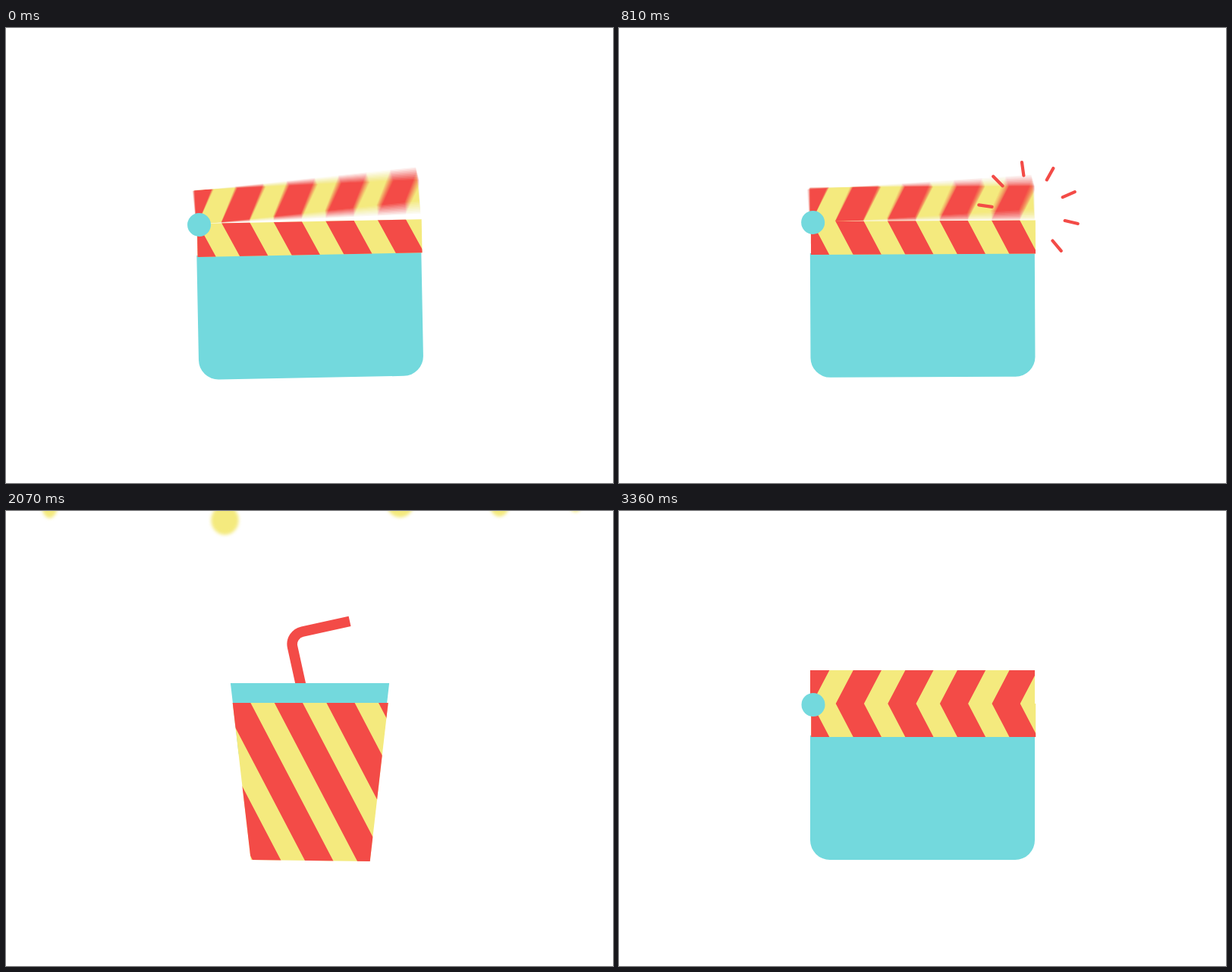
Recreate the animation shown at these times as an HTML page. Size 800 by 600 pixels, loop 3.63 s.

```html
<!DOCTYPE html>
<html lang="en">
<head>
<meta charset="utf-8">
<title>Movie snacks</title>
<style>
  html, body { margin: 0; width: 100%; height: 100%; overflow: hidden; background: #fff; }
  svg { display: block; width: 100%; height: 100%; }
</style>
</head>
<body>
<svg id="stage" viewBox="0 0 800 600">
  <defs>
    <clipPath id="armClip"><path id="armShape"/></clipPath>
    <clipPath id="bandClip"><path id="bandShape"/></clipPath>
  </defs>
  <g id="arm"></g>
  <path id="straw" d="M0 110V17A17 17 0 0 1 17 0H81" fill="none" stroke="#f34b47" stroke-width="13.6"/>
  <g id="corn" fill="#f4ea7e">
    <path id="heap" d="M309 240V210A92 65 0 0 1 493 210V240Z"/>
  </g>
  <g id="board">
    <path id="cyan" fill="#73d9dd"/>
    <g clip-path="url(#bandClip)">
      <rect x="200" y="200" width="400" height="300" fill="#f4ea7e"/>
      <path id="bandRed" fill="#f34b47"/>
    </g>
    <circle id="hinge" cx="256" cy="255.5" fill="#73d9dd"/>
  </g>
  <path id="sparks" fill="none" stroke="#f34b47" stroke-width="4.2" stroke-linecap="round"/>
</svg>
<script>
const LOOP = 3630, STEP = 30, LAST = 3360;
const BLUR = 12, SHUTTER = 15;
const $ = id => document.getElementById(id);
const clamp = v => Math.min(1, Math.max(0, v));
const phase = (t, a, b) => clamp((t - a) / (b - a));
const ease = (t, a, b) => (1 - Math.cos(Math.PI * phase(t, a, b))) / 2;
const mix = (a, b, u) => a + (b - a) * u;

function add(parent, tag, attrs = {}) {
  const el = document.createElementNS('http://www.w3.org/2000/svg', tag);
  set(el, attrs);
  return parent.appendChild(el);
}
function set(el, attrs) {
  for (const k in attrs) el.setAttribute(k, attrs[k]);
}
function show(el, on) {
  el.style.display = on ? '' : 'none';
  return on;
}

// band: top, bottom, half widths, slant of the lower edge
// cyan: centre, top, bottom, half widths, radii of the lower corners
const clap = { band: [254, 298, 148, 148, 0], cyan: [400, 296, 460, 148, 148, 26, 26] };
const tub = { band: [253, 456, 104, 80.5, 2.5], cyan: [400.5, 205.5, 247.5, 113.5, 113.5, 20, 7] };
const cup = { band: [253, 461, 102.5, 78.5, 2], cyan: [400.5, 227, 322, 104.6, 94, 3, 3] };
const glass = { band: [243, 261, 80, 78, 0], cyan: [400.5, 250, 480.5, 77.5, 60.3, 12, 34] };

function pose(t, part) {
  const [a, b, u] =
    t < 1240 ? [clap, tub, ease(t, 840, 1240)] :
    t < 2070 ? [tub, cup, ease(t, 1240, 2070)] :
    t < 2740 ? [cup, glass, ease(t, 2070, 2500)] :
    [glass, clap, ease(t, 2740, 3050)];
  return a[part].map((v, i) => mix(v, b[part][i], u));
}

function slants(y0, y1, lean) {
  let d = '';
  for (let x = 79.9; x < 580; x += 68.6) {
    const a = x + lean * (y0 - 254), b = x + lean * (y1 - 254);
    d += `M${a} ${y0}h37.2L${b + 37.2} ${y1}h-37.2Z`;
  }
  return d;
}
set($('bandRed'), { d: slants(200, 500, 0.523) });

// Each layer brings its own white ground, so stacking them gives a true mean
const arms = Array.from({ length: BLUR }, (_, i) => {
  const layer = add($('arm'), 'g', { opacity: 1 / (i + 1) });
  add(layer, 'rect', { width: 800, height: 600, fill: '#fff' });
  const g = add(layer, 'g', { 'clip-path': 'url(#armClip)' });
  add(g, 'rect', { x: 252, y: 210, width: 296, height: 45, fill: '#f4ea7e' });
  add(g, 'path', { d: slants(210, 255, -0.523), fill: '#f34b47' });
  return g;
});

// Mirrored rows: distance from the middle, y, radii, exit heights left and right
const rows = [
  [0, 151, 17, 18, -70, -70], [30, 151, 26, 28, 12, -11], [64, 168, 19, 25, -40, -10],
  [78, 195, 15, 29, -60, -60], [90, 211, 15, 25, -8, -16]
];
const kernels = rows.flatMap(([dx, y, rx, ry, left, right]) => [-1, 1].map(side => ({
  el: add($('corn'), 'ellipse'), x: 400 + side * dx + (211 - y) * 0.07, y, rx, ry,
  toX: 404 + side * dx * 3.85, toY: side < 0 ? left : right
})));

function boardAngle(t) {
  return t < 681 ? -21 * ease(t, -117, 681) : -21 * (1 - ease(t, 681, 820));
}
function armAngle(t) {
  if (t < 675) return -54 + 50.7 * (1 - Math.min(t, 480) / 480) ** 2;
  if (t < 2900) return -54 * (1 - ease(t, 675, 825));
  return -140 * (1 - phase(t, 3000, 3360) ** 1.17);
}

function drawArm(t) {
  if (!show($('arm'), t < 980 || t > 3000)) return;
  const opening = t > 3000, grow = opening ? phase(t, 3000, 3360) : 1;
  const h = 45 * (opening ? clamp(grow * 5) : 1 - ease(t, 860, 980));
  set($('armShape'), { d: `M252 ${255 - h}h${296 * grow}v${h}H252Z` });
  const shutter = t === LAST ? 0 : SHUTTER;
  arms.forEach((g, i) => {
    const s = t + shutter * (i / (BLUR - 1) - 0.5);
    set(g, { transform: `rotate(${boardAngle(s)} 462 333) rotate(${armAngle(s)} 253 254)` });
  });
}

function drawBoard(t) {
  set($('board'), { transform: `rotate(${boardAngle(t)} 462 333)` });
  const [y0, y1, w0, w1, slant] = pose(t, 'band'), m = 401.2;
  set($('bandShape'), {
    d: `M${m - w0} ${y0}H${m + w0}L${m + w1} ${y1 + slant / 2}L${m - w1} ${y1 - slant / 2}Z`
  });
  const [c, top, bot, a, b, rx, ry] = pose(t, 'cyan');
  set($('cyan'), {
    d: `M${c - a} ${top}H${c + a}L${c + b} ${bot - ry}A${rx} ${ry} 0 0 1 ${c + b - rx} ${bot}` +
       `H${c - b + rx}A${rx} ${ry} 0 0 1 ${c - b} ${bot - ry}Z`
  });
  set($('hinge'), { r: 15.5 * (1 - ease(t, 840, 960) + ease(t, 3080, 3300)) });
}

function drawCorn(t) {
  const corn = $('corn');
  if (!show(corn, t > 1020 && t <= 2160)) return;
  const back = phase(t, 1020, 1240) - 1, pop = 1 + 2 * back ** 3 + back ** 2;
  set(corn, { transform: `translate(401 247) scale(${pop}) translate(-401 -247)` });
  const fly = Math.max(0, (t - 1850) / 220) ** 1.4, size = 1 - 0.3 * clamp(fly);
  corn.style.filter = fly > 0 ? 'blur(2px)' : 'none';
  const sink = 1 - ease(t, 1800, 1930);
  set($('heap'), { transform: `translate(0 ${240 * (1 - sink)}) scale(1 ${sink})` });
  for (const k of kernels) set(k.el, {
    cx: mix(k.x, k.toX, fly), cy: mix(k.y, k.toY, fly), rx: k.rx * size, ry: k.ry * size
  });
}

function drawStraw(t) {
  if (!show($('straw'), t > 1800 && t < 2920)) return;
  const tilt = mix(-12.4, -1.8, ease(t, 2130, 2560));
  const drop = 190 * (1 - ease(t, 1800, 2020) + ease(t, 2720, 2920));
  set($('straw'), { transform: `translate(0 ${drop}) rotate(${tilt} 421 224) translate(388.2 154)` });
}

function drawSparks(t) {
  if (!show($('sparks'), t > 780 && t < 1080)) return;
  const head = mix(45, 252, phase(t, 780, 1070)), tail = mix(46, 247, phase(t, 806, 1080));
  let d = '';
  for (let i = 0; i < 7; i++) {
    const a = (188.3 + 36.95 * i) * Math.PI / 180;
    const at = r => `${540 + r * Math.cos(a)} ${243 + r * Math.sin(a)}`;
    d += `M${at(tail)}L${at(head)}`;
  }
  set($('sparks'), { d });
}

const start = performance.now();
function tick() {
  const now = (performance.now() - start) % LOOP;
  const t = Math.min(LAST, Math.floor(now / STEP) * STEP);
  for (const part of [drawArm, drawStraw, drawCorn, drawBoard, drawSparks]) part(t);
  requestAnimationFrame(tick);
}
tick();
</script>
</body>
</html>
```
